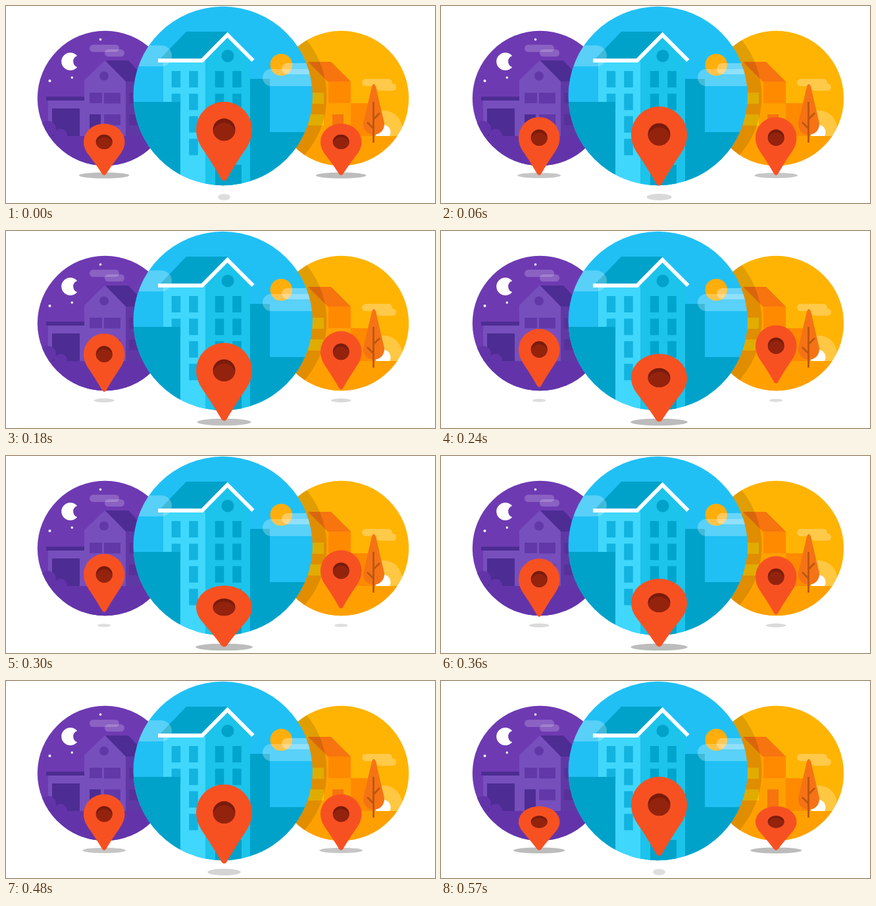
An HTML page for the animation above (660 ms loop, 652 by 300 pixels).

```html
<!DOCTYPE html>
<html lang="en">
<head>
<meta charset="utf-8">
<title>Bouncing map pins</title>
<style>
html, body { margin: 0; width: 652px; height: 300px; overflow: hidden; background: #fff; }
svg { display: block; }
</style>
</head>
<body>
<svg id="stage" width="652" height="300" viewBox="0 0 652 300">
  <defs>
    <clipPath id="nightClip"><circle cx="150.5" cy="140.5" r="102.7"/></clipPath>
    <clipPath id="dayClip"><circle cx="329.7" cy="137" r="136.2"/></clipPath>
    <clipPath id="duskClip"><circle cx="509.5" cy="140.5" r="102.7"/></clipPath>
    <clipPath id="horizon"><path d="M400 0h252v198h-252z"/></clipPath>
    <g id="pin">
      <path fill="#f75122" d="M-4-3C-10-14-20-30-30-45C-37-55-42.500-65-42.500-78.500A42.500 42.500 0 0 1 42.500-78.500C42.500-65 37-55 30-45C20-30 10-14 4-3Q0 2-4-3z"/>
      <g transform="translate(0 -78.500)">
        <circle r="17" fill="#791b0b"/>
        <path fill="#94230e" d="M-16.700 3A17 17 0 0 1 16.700 3A17 17 0 0 1-16.700 3z"/>
      </g>
    </g>
  </defs>

  <!-- Night -->
  <g clip-path="url(#nightClip)">
    <path fill="#6e3ab2" d="M40 30h220v220h-220z"/>
    <g fill="#fff">
      <path d="M108.200 76A13.500 13.500 0 1 0 108.200 93A9 9 0 0 1 108.200 76z"/>
      <circle cx="143.5" cy="51" r="1.8"/>
      <circle cx="66.5" cy="114" r="2"/>
      <circle cx="100.3" cy="109" r="1.8"/>
    </g>
    <g fill="#fff" fill-opacity=".2">
      <rect x="127" y="59" width="45" height="11" rx="5.5"/>
      <rect x="150" y="66" width="30" height="11" rx="5.5"/>
    </g>
    <path fill="#6038a6" d="M182 114h40v84h-40z"/>
    <path fill="#764fbd" d="M119 113L150 83L182 114V198H119zM64 144h55v54h-55z"/>
    <path fill="#4d2c93" d="M151 83H186L216 115H182zM61 138h58v6h-58zM70 156h42v42h-42zM127 165h17v33h-17z"/>
    <path fill="#6238a9" d="M127 132h19v16h-19z"/>
    <g stroke-width="25" stroke-dasharray="16.5">
      <path stroke="#6238a9" d="M161.500 132v50"/>
      <path stroke="#573199" d="M199.500 132v50"/>
    </g>
    <circle cx="149" cy="106.5" r="7" fill="#6238a9"/>
    <g fill="#6334a9">
      <path d="M40 198h220v52h-220z"/>
      <circle cx="64" cy="187" r="12"/>
      <circle cx="83" cy="197" r="10"/>
    </g>
  </g>

  <!-- Dusk -->
  <g clip-path="url(#duskClip)">
    <path fill="#ffb403" d="M400 30h220v220h-220z"/>
    <g clip-path="url(#horizon)" fill="#fff">
      <circle cx="574" cy="187" r="28" fill-opacity=".25"/>
      <circle cx="572.5" cy="192.5" r="12"/>
    </g>
    <g fill="#fff" opacity=".28">
      <rect x="541" y="111" width="46" height="11" rx="5.5"/>
      <rect x="563" y="118" width="30" height="11" rx="5.5"/>
    </g>
    <path fill="#ffa000" d="M440 198V110L460 85L490 115H524V198zM400 198h220v52h-220z"/>
    <path fill="#ff8a00" d="M490 115h34v33h38v50h-38v-50h-34z"/>
    <path fill="#f7740f" d="M459 85H494L524 115H489zM496 165h17v33h-17z"/>
    <path stroke="#ffc400" stroke-width="24" stroke-dasharray="17 16" d="M471 132v50"/>
    <path fill="#f57315" d="M559 119C561 119 562 122 563 127L574 174C578 187 569 196 559 196S540 187 544 174L555 127C556 122 557 119 559 119z"/>
    <path fill="none" stroke="#bd560e" stroke-width="2.8" d="M558.500 146V208M549 177L558.500 186.500M568 163L558.500 172.500"/>
    <circle cx="351.5" cy="137.5" r="136" fill-opacity=".12"/>
  </g>

  <!-- Day -->
  <g clip-path="url(#dayClip)">
    <path fill="#20c0f5" d="M190 0h280v275h-280z"/>
    <path fill="#00a2ca" d="M274 39H337L298 83H232zM371 111H401V192H470V275H371z"/>
    <path fill="#40d7fc" d="M239 84h64v191h-64z"/>
    <path fill="#1cc3eb" d="M303 82L337 46L371 82V275H303z"/>
    <g stroke-dasharray="25 9.4">
      <path stroke="#12b3df" stroke-width="13.5" d="M258.500 99v60M285 99v130"/>
      <path stroke="#00a5cd" stroke-width="13.5" d="M324.500 99v130M351 99v130"/>
    </g>
    <path fill="#00a2ca" d="M190 146h75v129h-75zM318 242h40v33h-40z"/>
    <circle cx="337" cy="76" r="9.5" fill="#00a2ca"/>
    <rect x="170" y="60" width="82" height="32" rx="16" fill="#fff" fill-opacity=".25"/>
    <path fill="none" stroke="#fff" stroke-width="6" d="M231 83H298L336.500 44L375.500 83"/>
    <circle cx="418.3" cy="89.5" r="16.8" fill="#ffae0b"/>
    <g fill="#fff">
      <rect x="390" y="96" width="100" height="26" rx="13" fill-opacity=".26"/>
      <rect x="419" y="87" width="70" height="17" rx="8.5" fill-opacity=".33"/>
    </g>
  </g>
</svg>

<script>
const LOOP = 660, STEP = 30, LAST = 570;
const stage = document.getElementById('stage');

// Times in ms: highest point (peak), half the flight (air), deepest squash (hit)
const side = { size: .735, floor: 258, peak: 270, air: 210, hit: 585, dent: .25, wide: 39, least: 9.5, fade: 300, thin: 1.8, grow: .07 };
const pins = [
  { ...side, x: 149.2, lift: 21 },
  { ...side, x: 509.2, lift: 27 },
  { x: 331.5, size: 1, floor: 291, lift: 26, peak: 615, air: 262, hit: 300, dent: .225,
    wide: 43.5, least: 7, fade: 270, thin: 4.7, grow: .015 }
];

function set(el, attrs) {
  for (const name in attrs) el.setAttribute(name, attrs[name]);
}

function add(tag, attrs) {
  const el = document.createElementNS('http://www.w3.org/2000/svg', tag);
  set(el, attrs);
  return stage.appendChild(el);
}

// Smooth hump from 0 to 1 and back around a centre time, wrapping with the loop
function hump(t, centre, half) {
  const gap = Math.abs(t - centre);
  const d = Math.min(gap, LOOP - gap, half);
  return Math.cos(d / half * Math.PI / 2) ** 2;
}

for (const p of pins) {
  p.shadow = add('ellipse', { cx: p.x, cy: p.floor });
  p.marker = add('use', { href: '#pin' });
}

function draw() {
  const t = Math.min(LAST, Math.floor(performance.now() % LOOP / STEP) * STEP);
  for (const p of pins) {
    const tip = p.floor - p.lift * hump(t, p.peak, p.air);
    const squash = 1 - p.dent * hump(t, p.hit, 142);
    const half = p.wide - (p.wide - p.least) * hump(t, p.peak, p.fade);
    const grey = Math.round(224 - 36 * (half / p.wide) ** 2);
    set(p.shadow, { rx: half, ry: p.thin + p.grow * half, fill: `rgb(${grey},${grey},${grey})` });
    set(p.marker, { transform: `translate(${p.x} ${tip}) scale(${p.size} ${p.size * squash})` });
  }
  requestAnimationFrame(draw);
}
draw();
</script>
</body>
</html>
```
